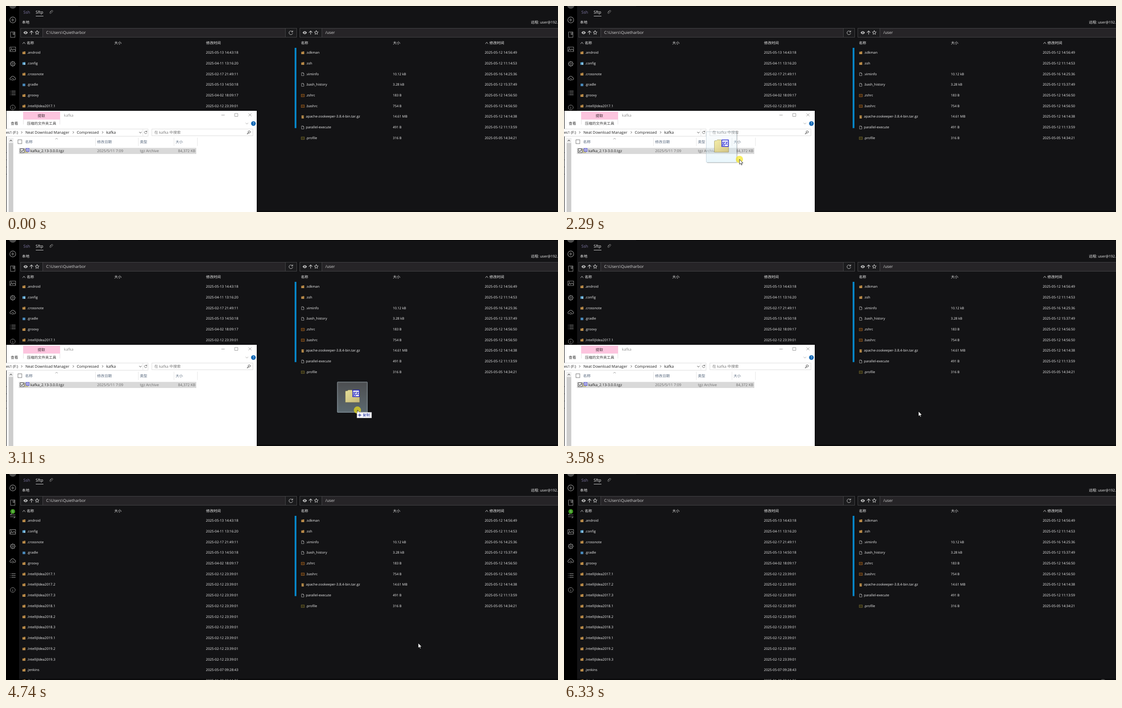
Write an HTML page that moves like this. It is 1224 px wide and 458 px high and loops after 6.4 s.

```html
<!DOCTYPE html>
<html lang="zh-CN">
<head>
<meta charset="utf-8">
<title>Sftp</title>
<style>
html, body { margin: 0; width: 100%; height: 100%; overflow: hidden; background: #131315; }
svg { display: block; width: 1224px; height: 458px; }
text {
  font-family: "Open Sans", "Noto Sans CJK SC", "Noto Sans CJK", sans-serif;
  text-rendering: geometricPrecision; white-space: pre;
}
.line { fill: none; stroke-linecap: round; stroke-linejoin: round; }
.pulse { animation: pulse 640ms ease-in-out infinite alternate; }
@keyframes pulse { from { opacity: .8; } to { opacity: 1; } }
</style>
</head>
<body>
<svg id="stage" viewBox="0 0 1224 458">
  <defs>
    <linearGradient id="glass" x2="0" y2="1">
      <stop offset="0" stop-color="#eef5f9" stop-opacity=".26"/>
      <stop offset="1" stop-color="#c6e9f7" stop-opacity=".4"/>
    </linearGradient>
    <linearGradient id="paper" x2="1" y2="1">
      <stop offset="0" stop-color="#f4eda0"/>
      <stop offset="1" stop-color="#d3c27c"/>
    </linearGradient>
  </defs>
  <g id="app"></g>
  <g id="side"></g>
  <g id="win"></g>
  <g id="drag"></g>
  <g id="pointer"></g>
</svg>
<script>
const $ = id => document.getElementById(id);

// y is the vertical middle of the text
const txt = (x, y, s, size = 7.6, fill = '#f2f2f2', anchor = 'start') =>
  `<text x="${x}" y="${(y + size * .36).toFixed(2)}" font-size="${size}" fill="${fill}" text-anchor="${anchor}">${s}</text>`;
const box = (x, y, w, h, fill, more = '') =>
  `<rect x="${x}" y="${y}" width="${w}" height="${h}" fill="${fill}" ${more}/>`;
const line = (d, color, w = 1, more = '') =>
  `<path class="line" d="${d}" stroke="${color}" stroke-width="${w}" ${more}/>`;
const at = (x, y, s, id = '') => `<g ${id && `id="${id}"`} transform="translate(${x} ${y})">${s}</g>`;

// File list icons, centred on 0,0
const icons = {
  dir: '<path d="M-3.3-2.2H-.6L.2-3H3.3V3H-3.3Z" fill="#c0904c"/>' + line('M-2.6-.9H2.6', '#8a6431', .7),
  cfg: '<path d="M-3.3-2.4H-.6L.2-3H3.2V3H-3.3Z" fill="#5da5cf"/><circle cx="1.6" cy="1.2" r="1.7" fill="#a9d4ea"/>',
  tool: box(-3, -2.5, 6, 5.5, '#4a8bbd'),
  file: line('M-2.3-3.2H.8L2.5-1.5V3.4H-2.3ZM.7-3.2V-1.3H2.5', '#b8b8b8', .8),
  term: box(-3.2, -2.6, 6.6, 5.6, '#2a1c0c', 'stroke="#b8702a" stroke-width=".8"') + line('M-1.8 .2H1.8', '#b8702a', .6),
  prof: box(-3.2, -2.6, 6.6, 5.6, '#1d1c0e', 'stroke="#8a7c34" stroke-width=".8"') + line('M-1.8 .2H1.8', '#8a7c34', .6),
  zip: box(-2.6, -3.2, 5, 7, '#b98d4c') + line('M.8-2.6V1', '#5f4420', .8, 'stroke-dasharray="1 1.3"')
};

const rowY = i => 103.4 + i * 23.72;
const idea = ['2017.1', '2017.2', '2017.3', '2018.1', '2018.2', '2018.3', '2019.1', '2019.2', '2019.3'];
const local = [
  ['dir', '.android', '2025-05-13 14:43:18'],
  ['cfg', '.config', '2025-04-11 13:16:20'],
  ['dir', '.crossnote', '2025-02-17 21:49:11'],
  ['tool', '.gradle', '2025-05-13 14:50:18'],
  ['dir', '.groovy', '2025-04-02 18:09:17'],
  ...idea.map(v => ['dir', '.IntelliJIdea' + v, '2025-02-12 23:39:01']),
  ['dir', '.jenkins', '2025-05-07 09:28:43'],
  ['dir', '.jkind', '2025-01-20 22:11:36']
];
const remote = [
  ['dir', '.sdkman', '', '12 14:56:49'],
  ['dir', '.ssh', '', '12 11:14:53'],
  ['file', '.viminfo', '10.12 kB', '16 14:25:36'],
  ['file', '.bash_history', '3.28 kB', '12 15:37:49'],
  ['term', '.zshrc', '183 B', '12 14:56:50'],
  ['term', '.bashrc', '754 B', '12 14:56:50'],
  ['zip', 'apache-zookeeper-3.8.4-bin.tar.gz', '14.61 MB', '12 14:14:38'],
  ['file', 'parallel-execute', '491 B', '12 11:13:59'],
  ['prof', '.profile', '316 B', '05 14:34:21']
];

const star = Array.from({ length: 10 }, (_, i) => {
  const r = i % 2 ? 2.1 : 4.6, a = i * Math.PI / 5;
  return (r * Math.sin(a)).toFixed(2) + ' ' + (-r * Math.cos(a)).toFixed(2);
}).join('L');

function pathBar(x, inputW, path) {
  const c = '#d2d2d2';
  return box(x + .5, 49.5, 49, 20, '#1b1b1d', 'stroke="#454547"') +
    box(x + 49.5, 49.5, inputW, 20, '#262427', 'stroke="#454547"') +
    at(x + 11.5, 59.2, `<path d="M-4.8 0Q0-6.6 4.8 0Q0 6.6-4.8 0Z" fill="${c}"/><circle r="1.9" fill="#1b1b1d"/><circle r=".9" fill="${c}"/>`) +
    line(`M${x + 24.5} 63V55.4M${x + 21} 58.8l3.5-3.5l3.5 3.5`, c, 1.1) +
    at(x + 37, 59.3, line(`M${star}Z`, c)) +
    txt(x + 57, 59.3, path, 8.75, '#d6d6d6');
}

const heads = (xs, y = 82.3) => txt(xs[0], y, '名称', 8.1) + txt(xs[1], y, '大小', 8.1) + txt(xs[2], y, '修改时间', 8.2);
const caret = x => line(`M${x - 2.7} 84l2.7-3.6l2.7 3.6`, '#d8d8d8', .9);

$('app').innerHTML =
  box(0, 0, 1224, 458, '#131315') + box(160, 0, 1064, 1, '#000') + box(29, 455, 1195, 3, '#0b0b0c') +
  txt(38.5, 13.5, 'Ssh', 9, '#8079a6') + txt(65.8, 13.5, 'Sftp', 9.1) + box(66, 22, 17, 1, '#cfcfcf') +
  line('M97.4 13.4l3.2-3.1q2-1.5 3 .2q.6 1.2-.5 2.2l-3.5 3.5q-1.4 1-2.2-.1q-.6-1 .4-1.9l3-2.9', '#9a9a9a', .9) +
  txt(35.5, 36, '本地', 8.2) + txt(1164, 36, '远程: user@192.168.1.10', 8) +
  pathBar(32, 538, 'C:\\Users\\Quietharbor') + pathBar(651, 600, '/user') +
  box(619.5, 49.5, 25, 20, '#1b1b1d', 'stroke="#454547"') +
  line('M635.4 57.4A4.2 4.2 0 1 0 635.8 60.8M635.8 55v2.8h-2.8', '#c8c8c8') +
  caret(39.8) + heads([46, 240, 443.5]) + caret(1066) + heads([654, 858, 1072]) +
  local.map(([k, n, d], i) => at(39.8, rowY(i) + .6, icons[k]) + txt(46.8, rowY(i), n) + txt(443.3, rowY(i), d)).join('') +
  remote.map(([k, n, s, d], i) => at(658, rowY(i) + .6, icons[k]) + txt(665, rowY(i), n) +
    txt(857.7, rowY(i), s, 7.4) + txt(1061.5, rowY(i), '2025-05-' + d)).join('') +
  box(640, 93, 4, 178.5, '#0784c6') +
  at(1195, 459.5, '<ellipse rx="5.5" ry="3.4" fill="#4a4a4a"/>', 'cap');

// Sidebar
const g = '#8c8c8c';
const teeth = Array.from({ length: 8 }, (_, i) =>
  `<path d="M0-4.3V-6" stroke="${g}" stroke-width="2" transform="rotate(${i * 45})"/>`).join('');
$('side').innerHTML = box(0, 0, 29, 458, '#000') +
  '<circle cx="15" cy="-2" r="8" fill="#4c4c4c"/>' +
  at(15, 31, `<circle class="line" r="6.6" stroke="${g}" stroke-width="1.2"/>` + line('M-3.2 0H3.2M0-3.2V3.2', g, 1.2)) +
  at(15, 63.8, line('M-4.8-6H4.8V6H-4.8ZM.6-6V-.4L2-1.6L3.4-.4V-6', g, 1.1)) +
  '<g id="swap"><g class="pulse">' + line('M20.4 91H9.5l3-3M9.6 95H20.5l-3 3', '#a2a2a2', 1.1) + '</g>' +
  at(15, 83.3, '<circle r="5.2" fill="#3f9d22"/>' + txt(0, 0, '1', 7, '#fff', 'middle'), 'badge') + '</g>' +
  '<g id="lower">' +
  at(15, 96.3, line('M-6.3-5H6.3V5H-6.3ZM-6 3.4l3.5-3.7l2.4 2.3l2.8-3L6 2.6', g, 1.1) + `<circle cx="-3" cy="-2.2" r="1" fill="${g}"/>`) +
  at(15, 128.5, teeth + `<circle class="line" r="4.6" stroke="${g}" stroke-width="1.2"/><circle class="line" r="1.9" stroke="${g}"/>`) +
  at(15, 161, line('M-3.4 3.2H-4Q-6.6 2.8-6.3 .4Q-6-1.6-4-1.9Q-2.9-5 0-5Q2.9-5 4-1.9Q6-1.6 6.3 .4Q6.6 2.8 4 3.2H3.4', g, 1.1) +
    `<circle class="line" cy="2.2" r="2.2" stroke="${g}"/>`) +
  at(15, 193.3, line('M-2.6-4H5.8M-2.6 0H5.8M-2.6 4H5.8M-5.6-4h.3M-5.6 0h.3M-5.6 4h.3', g, 1.2)) +
  at(15, 225.5, `<circle class="line" r="5.4" stroke="${g}"/>` + line('M0-.6V2.8M0-2.8v.1', g, 1.1)) + '</g>';

// File manager window
const ink = '#1c1c1c', dim = '#6d6d6d';
const chev = x => line(`M${x} 278.8l2 2.2l-2 2.2`, '#444', .9);
$('win').innerHTML =
  box(0, 231, 558, 227, '#000', 'opacity=".35"') + box(1, 233, 555, 225, '#fff') +
  box(38, 235, 82, 17.5, '#fcc4de') + line('M38.5 253V263M119.5 253V263', '#e2dfe0') +
  txt(78.5, 243.8, '提取', 8.2, '#3c2a33', 'middle') + txt(128.5, 242.5, 'kafka', 8.35, '#8d8d8d') +
  txt(10.5, 261, '查看', 8.2, '#333') + txt(46.5, 261, '压缩的文件夹工具', 8.1, '#333') +
  line('M478 242.5H484.5M507.5 239H514V245.5H507.5ZM538 239l6 6M544 239l-6 6', '#8f8f8f', .9) +
  line('M531.6 260l2.6 2.5l2.6-2.5', '#999', .9) +
  '<circle cx="548.6" cy="261.2" r="5.2" fill="#1067b5"/>' + txt(548.6, 261.2, '?', 8, '#fff', 'middle') +
  box(-2, 273.5, 317, 16, '#fff', 'stroke="#dcdcdc"') + line('M303.5 274V289', '#e2e2e2') +
  txt(0, 281.2, 'es1 (F:)', 8.2, ink) + chev(34) + txt(43, 281.2, 'Neat Download Manager', 8.4, ink) + chev(148.3) +
  txt(157, 281.2, 'Compressed', 8.35, ink) + chev(213.4) + txt(222.3, 281.2, 'kafka', 8.5, ink) +
  line('M295.6 280.3l2.4 2.3l2.4-2.3', '#444') + line('M311.8 279.2A2.8 2.8 0 1 0 312.4 281.8M312.3 277.6v1.9h-1.9', '#555', .9) +
  box(323.5, 273.5, 224, 15, '#fff', 'stroke="#dcdcdc"') + txt(329, 281.2, '在 kafka 中搜索', 8.3, '#767676') +
  '<circle class="line" cx="539.3" cy="280" r="2.4" stroke="#444"/>' + line('M537.4 282l-2.5 2.6', '#444', 1.2) +
  line('M198.5 293V311M293.5 293V311M372.5 293V311M424.5 293V311', '#e6e6e6') +
  box(26.5, 297.5, 8.5, 8.5, '#fff', 'stroke="#777"') + line('M109.8 296l2.4-2l2.4 2', '#777', .8) +
  txt(42.5, 302, '名称', 8.3, '#53647a') + txt(202, 302, '修改日期', 8.1, '#53647a') +
  txt(297, 302, '类型', 8.1, '#53647a') + txt(376, 302, '大小', 8.1, '#53647a') +
  box(5.5, 293, 11, 165, '#f0f0f0') + box(6, 304.5, 10, 154, '#cdcdcd') + line('M8.6 300.4l2.3-2.4l2.3 2.4', '#555', 1.1) +
  [326, 342, 358, 374].map(y => line(`M1 ${y - 1.5}l1.4 1.5l-1.4 1.5`, '#999', .8)).join('') +
  box(28.5, 315.5, 393.5, 13.5, '#d9d9d9', 'id="row"') +
  box(31.5, 317.5, 8.5, 8.5, '#fff', 'stroke="#333"') + line('M33.3 321.7l1.9 2.1l3.4-4.2', '#222', 1.1) +
  box(42, 319, 6.5, 7, '#e5dc94', 'stroke="#77724a" stroke-width=".6"') + box(44.3, 316.8, 6.8, 6.6, '#fff', 'stroke="#2525c4"') +
  line('M46 319h3.4M46 321.3h3.4', '#2525c4') +
  txt(54, 322.2, 'kafka_2.13-3.0.0.tgz', 8.2, ink) + txt(202, 322.2, '2025/5/11 7:09', 8.3, dim) +
  txt(297, 322.2, 'tgz Archive', 8.3, dim) + txt(420, 322.2, '84,372 KB', 8.35, dim, 'end');

$('drag').innerHTML =
  line('M69 3V69.500H3', '#000', 1.5, 'opacity=".2"') +
  box(.5, .5, 67, 68, 'url(#glass)', 'rx="1.5" stroke="#a9bcc8" stroke-opacity=".6"') +
  box(2, 2, 64, 65, 'none', 'stroke="#fff" stroke-opacity=".15"') +
  '<g opacity=".9"><path d="M18.5 22q0-1.5 1.5-1.5h3l2-2h8q1.5 1.5 2 2H50V46H18.5Z" fill="url(#paper)" stroke="#86804f" stroke-width=".7"/>' +
  box(35, 18.8, 14.5, 14.5, '#fff', 'stroke="#1616d2" stroke-width="1.6"') +
  '<text x="42.2" y="28.6" font-size="11.5" font-weight="700" fill="#1616d2" text-anchor="middle" style="font-family:\'Noto Serif\',serif">gz</text></g>';

$('pointer').innerHTML =
  '<circle id="glow" r="8" fill="#f4e414" fill-opacity=".67"/>' +
  '<path d="M0 0V11L2.6 8.7L4.4 12.5L6.1 11.7L4.4 8.1H8Z" fill="#fff" stroke="#000" stroke-width=".8"/>' +
  at(-1.5, 4.5, box(.5, .5, 32.5, 12.5, '#fff', 'stroke="#b9b9c4" stroke-width=".7"') +
    line('M6.5 3V10.5M2.8 6.7H10.2M4.6 4.8l3.8 3.8M8.4 4.8l-3.8 3.8', '#24318f', .9) +
    txt(13, 6.8, '复制', 8.1, '#1a2c9c'), 'copy');

// Bursts of change: start, end, number of intervals
const bursts = [
  [0, 1, 1], [730, 1340, 9], [1410, 1540, 2], [1750, 1751, 1], [2010, 2640, 9], [2700, 3320, 9],
  [3580, 3650, 1], [3990, 4060, 1], [4330, 4940, 9], [5020, 5640, 9], [5690, 6330, 9]
];
// Pointer track: time, x, y
const track = [
  [730, 271, 436], [930, 172, 384], [1130, 100, 340], [1340, 74, 327], [1410, 80, 322], [1540, 80, 320], [1940, 80, 320],
  [2010, 118, 324], [2200, 302, 341], [2290, 389, 341], [2570, 620, 347], [2640, 655, 349], [2700, 680, 353], [2950, 752, 371],
  [3110, 779, 378], [3320, 793, 385], [3580, 786, 381], [4330, 790, 381], [4740, 915, 376], [4940, 1131, 392],
  [5020, 1160, 399], [5300, 1202, 424], [5640, 1191, 448], [5900, 1191, 462], [6400, 1191, 474]
];

function snap(t) {
  const [a, b, n] = bursts.filter(s => s[0] <= t).pop();
  const step = (b - a) / n;
  return a + step * Math.min(n, Math.floor((t - a) / step + .12));
}

function pos(t) {
  let i = 1;
  while (i < track.length - 1 && track[i][0] < t) i++;
  const [p, q] = [track[i - 1], track[i]];
  const k = Math.max(0, Math.min(1, (t - p[0]) / (q[0] - p[0])));
  return [p[1] + (q[1] - p[1]) * k, p[2] + (q[2] - p[2]) * k];
}

const show = (id, on) => $(id).style.display = on ? '' : 'none';
const move = (id, x, y) => $(id).setAttribute('transform', `translate(${x.toFixed(1)} ${y.toFixed(1)})`);

function draw(time) {
  const t = snap(time), [x, y] = pos(t), [lx, ly] = pos(t - 36);
  move('pointer', x, y);
  // the dragged item trails the pointer a little
  move('drag', Math.round(lx - 39), Math.round(ly - 62));
  show('pointer', t >= 730);
  show('drag', t >= 2010 && t < 3580);
  show('glow', t >= 1750 && t < 3580);
  show('copy', t >= 2700 && t < 3580);
  show('win', t < 3650);
  show('swap', t >= 3990);
  show('cap', t >= 6050);
  move('lower', 0, t >= 3990 ? 32.3 : 0);
  $('badge').setAttribute('transform', `translate(15 83.3) scale(${t < 4060 ? .6 : 1})`);
  const hot = t >= 1410 && t < 2010;
  $('row').setAttribute('fill', hot ? '#cce8ff' : '#d9d9d9');
  $('row').setAttribute('stroke', hot ? '#99d1ff' : 'none');
}

const t0 = performance.now();
function tick() {
  draw((performance.now() - t0) % 6400);
  requestAnimationFrame(tick);
}
draw(0);
requestAnimationFrame(tick);
</script>
</body>
</html>
```
